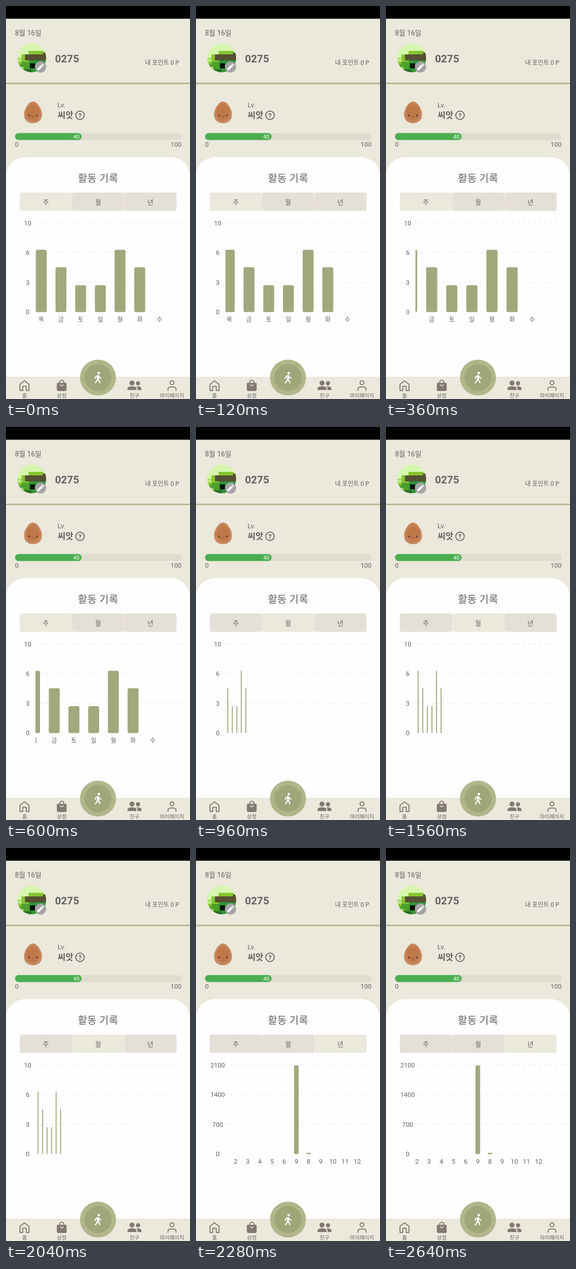
An HTML page that plays this animation: 368 by 788 pixels, repeating every 2760 ms.

```html
<!DOCTYPE html>
<html lang="ko">
<head>
<meta charset="utf-8">
<style>
  html, body { margin: 0; width: 100%; height: 100%; overflow: hidden; background: #fefefe; }
  svg { display: block; width: 368px; height: 788px; font-family: Roboto, "Noto Sans CJK KR", "Noto Sans CJK", sans-serif; }
  text { fill: #626262; }
  .mid { text-anchor: middle; }
  .line { fill: none; stroke: #817a70; stroke-width: 2; stroke-linecap: round; stroke-linejoin: round; }
  .solid { fill: #817a70; }
  .bar { fill: #a2a77c; }
</style>
</head>
<body>
<svg viewBox="0 0 368 788">
  <defs>
    <clipPath id="avatar"><circle cx="51.5" cy="104" r="28.8"/></clipPath>
    <clipPath id="plot"><rect x="59" y="425" width="305" height="215"/></clipPath>
    <radialGradient id="shell"><stop offset=".6" stop-color="#bf7848"/><stop offset="1" stop-color="#c98d63"/></radialGradient>
  </defs>

  <rect width="368" height="788" fill="#ebe8dc"/>
  <rect width="368" height="25.5" fill="#000"/>
  <rect y="153.8" width="368" height="2.8" fill="#b1b68a"/>

  <!-- Profile -->
  <text x="18" y="58.5" font-size="14">8월 16일</text>
  <g clip-path="url(#avatar)" shape-rendering="crispEdges">
    <rect x="22" y="75" width="60" height="60" fill="#d6f6ae"/>
    <path d="M22 104h9v-7h14v-7h30v6h5v40H22z" fill="#85c52e"/>
    <path d="M22 117h9v-5h15v24H22z" fill="#4f9f2d"/>
    <path d="M22 105h9v7h-9z" fill="#b8e77e"/>
    <path d="M22 122h13v12H22z" fill="#9edb50"/>
    <path d="M46 108h36v27H46z" fill="#319339"/>
    <path d="M38 97h36v-4h8v16H38z" fill="#565033"/>
    <path d="M48 115h10v10H48z" fill="#071009"/>
    <path d="M35 127h16v7H35z" fill="#256c27"/>
  </g>
  <circle cx="69" cy="122.3" r="11.2" fill="#a4a4a4"/>
  <path d="M62.6 128.8v-3.2l8-8 3.2 3.2-8 8zM71.5 116.7l1.5-1.5 3.2 3.2-1.5 1.5z" fill="#fff"/>
  <text x="98" y="112.5" font-size="21" font-weight="700">0275</text>
  <text x="278" y="118" font-size="12.2">내 포인트 0 P</text>

  <!-- Level -->
  <path d="M54 191.5C63 191.5 72 207 72 218C72 229 64 235 54 235S36 229 36 218C36 207 45 191.5 54 191.5z" fill="url(#shell)"/>
  <g fill="#6b4433"><circle cx="46" cy="219.5" r="2"/><circle cx="62" cy="219.5" r="2"/></g>
  <g fill="#d8736a"><circle cx="43" cy="223.5" r="1.8"/><circle cx="65" cy="223.5" r="1.8"/></g>
  <path d="M51 221q1.5 2 3 0q1.5 2 3 0" fill="none" stroke="#83503a"/>
  <text x="103" y="203.3" font-size="13.5">Lv.</text>
  <text x="103.3" y="225.3" font-size="17" font-weight="700">씨앗</text>
  <circle cx="148" cy="219.2" r="8.5" fill="none" stroke="#626262" stroke-width="1.8"/>
  <text class="mid" x="148" y="223.7" font-size="13" font-weight="700">?</text>
  <rect x="18" y="254.7" width="333" height="14" rx="7" fill="#dedbcf"/>
  <rect x="18" y="254.7" width="133.3" height="14" rx="7" fill="#4bae50"/>
  <text x="134.5" y="266" font-size="11" style="fill:#fff">40</text>
  <text x="18" y="282" font-size="13">0</text>
  <text x="351" y="282" font-size="13" text-anchor="end">100</text>

  <!-- Activity card -->
  <path d="M0 744V341A38 38 0 0 1 38 303H330A38 38 0 0 1 368 341V744z" fill="#fefefe"/>
  <text class="mid" x="184" y="353" font-size="20.5">활동 기록</text>
  <g id="tabs"></g>
  <g id="axis"></g>
  <g clip-path="url(#plot)"><g id="chart"></g></g>

  <!-- Navigation -->
  <rect y="743.7" width="368" height=".7" fill="#dcd8cd"/>
  <g class="line">
    <path d="M28 758.5L37 751.5L46 758.5V771H40.500V762.500H33.500V771H28z"/>
    <circle cx="332" cy="755.500" r="3.900"/>
    <path d="M324 770.500V769Q324 764 329 764H335Q340 764 340 769V770.500"/>
  </g>
  <g class="solid">
    <path d="M103.500 755.500H119.500Q121.300 755.500 121.300 757.300V769Q121.300 772 118.300 772H104.700Q101.700 772 101.700 769V757.300Q101.700 755.500 103.500 755.500z"/>
    <path d="M107.300 756V754.500A4.200 4.200 0 0 1 115.700 754.500V756" fill="none" stroke="#817a70" stroke-width="2"/>
    <circle cx="252" cy="756" r="5"/>
    <path d="M243 770V767.500Q243 762.500 252 762.500T261 767.500V770z"/>
    <circle cx="264" cy="756.500" r="4.200"/>
    <path d="M263 770V767Q263 764.500 261 762.800Q271 762 271 767.500V770z"/>
  </g>
  <path d="M108.500 758.500a3 3 0 0 0 6 0" fill="none" stroke="#ebe8dc" stroke-width="1.300"/>
  <g class="mid" font-size="10.5">
    <text x="37" y="785.3">홈</text><text x="111.500" y="785.3">상점</text>
    <text x="257" y="785.3">친구</text><text x="332" y="785.3">마이페이지</text>
  </g>
  <circle cx="184" cy="745" r="36" fill="#b1b68a"/>
  <circle cx="184" cy="745" r="27" fill="#a0a57a"/>
  <circle cx="185.500" cy="736" r="2.500" fill="#fff"/>
  <g fill="none" stroke="#fff" stroke-linecap="round" stroke-linejoin="round" stroke-width="2.300">
    <path d="M178.500 746.500L179.700 743L184 741L187 744.500L190 746"/>
    <path d="M184 742L182.800 748.500L186.300 751L187.700 755.500M182 750.500L181 753L178.500 755.500"/>
    <path d="M184.500 742L183.800 748" stroke-width="4"/>
  </g>
</svg>
<script>
const LOOP = 2760, BASE = 613.8;
const $ = id => document.getElementById(id);
const tops = [125, 90, 54, 54, 125, 90];

// Scroll and stretch are [time, value] keys; pivot is the edge the overscroll stretches from.
const views = [
  { start: 0, right: 353, pivot: 353, ticks: [10, 6, 3, 0], first: 70.5, step: 39.4, width: 21.8, radius: 3.5,
    bars: tops, labels: [...'목금토일월화수'], size: 12,
    scroll: [[50, 0], [250, -13.4]], stretch: [[240, 1], [360, 1.02], [540, 1]] },
  { start: 780, right: 342, pivot: 59, ticks: [10, 6, 3, 0], first: 64.2, step: 9, width: 1.9, radius: .8,
    bars: tops, labels: [],
    scroll: [[1300, -9.6], [1500, 0]], stretch: [[1460, 1], [1560, 1.02], [1760, 1]] },
  { start: 2140, right: 364, pivot: 364, ticks: [2100, 1400, 700, 0], first: 66.2, step: 24.34, width: 9.2, radius: 3,
    bars: [0, 0, 0, 0, 0, 0, 178, 2.5], labels: [1, 2, 3, 4, 5, 6, 9, 8, 9, 10, 11, 12], size: 13,
    scroll: [[2190, 0], [2400, -28.6]], stretch: [[2400, 1], [2500, 1.01], [2640, 1]] }
];

function valueAt(keys, t) {
  const i = keys.findIndex(k => k[0] > t);
  if (i === 0) return keys[0][1];
  if (i < 0) return keys[keys.length - 1][1];
  const [t0, a] = keys[i - 1], [t1, b] = keys[i];
  const p = (t - t0) / (t1 - t0);
  return a + (b - a) * p * p * (3 - 2 * p);
}

const label = (x, y, size, s) => `<text class="mid" x="${x}" y="${y}" font-size="${size}">${s}</text>`;

function build(view) {
  $('tabs').innerHTML = [...'주월년'].map((s, i) => {
    const x = 27.6 + i * 104.5;
    const fill = views[i] === view ? '#ebe8dc' : '#e5e0d7';
    return `<rect x="${x}" y="374" width="104.5" height="36.8" rx="4" fill="${fill}"/>` + label(x + 52.2, 397.6, 13, s);
  }).join('');

  $('axis').innerHTML = view.ticks.map((s, i) => {
    const y = 435 + i * 59.5;
    const grid = `<path d="M59 ${y}H${view.right}" stroke="#dadada" stroke-dasharray="3.6 7.15"/>`;
    return label(43.3, y + 4.8, 13, s) + (i < 3 ? grid : '');
  }).join('');

  const center = i => view.first + i * view.step;
  $('chart').innerHTML = view.bars.map((h, i) => h &&
    `<rect class="bar" x="${center(i) - view.width / 2}" y="${BASE - h}" width="${view.width}" height="${h}" rx="${Math.min(view.radius, h / 2)}"/>`
  ).join('') + view.labels.map((s, i) => label(center(i), 632.8, view.size, s)).join('');
}

let current;
function draw(now) {
  const t = now % LOOP;
  const view = views.filter(v => v.start <= t).pop();
  if (view !== current) build(current = view);
  const k = valueAt(view.stretch, t);
  const dx = view.pivot * (1 - k) + k * valueAt(view.scroll, t);
  $('chart').setAttribute('transform', `matrix(${k} 0 0 1 ${dx} 0)`);
}

const begin = performance.now();
function frame() {
  draw(performance.now() - begin);
  requestAnimationFrame(frame);
}
frame();
</script>
</body>
</html>
```
